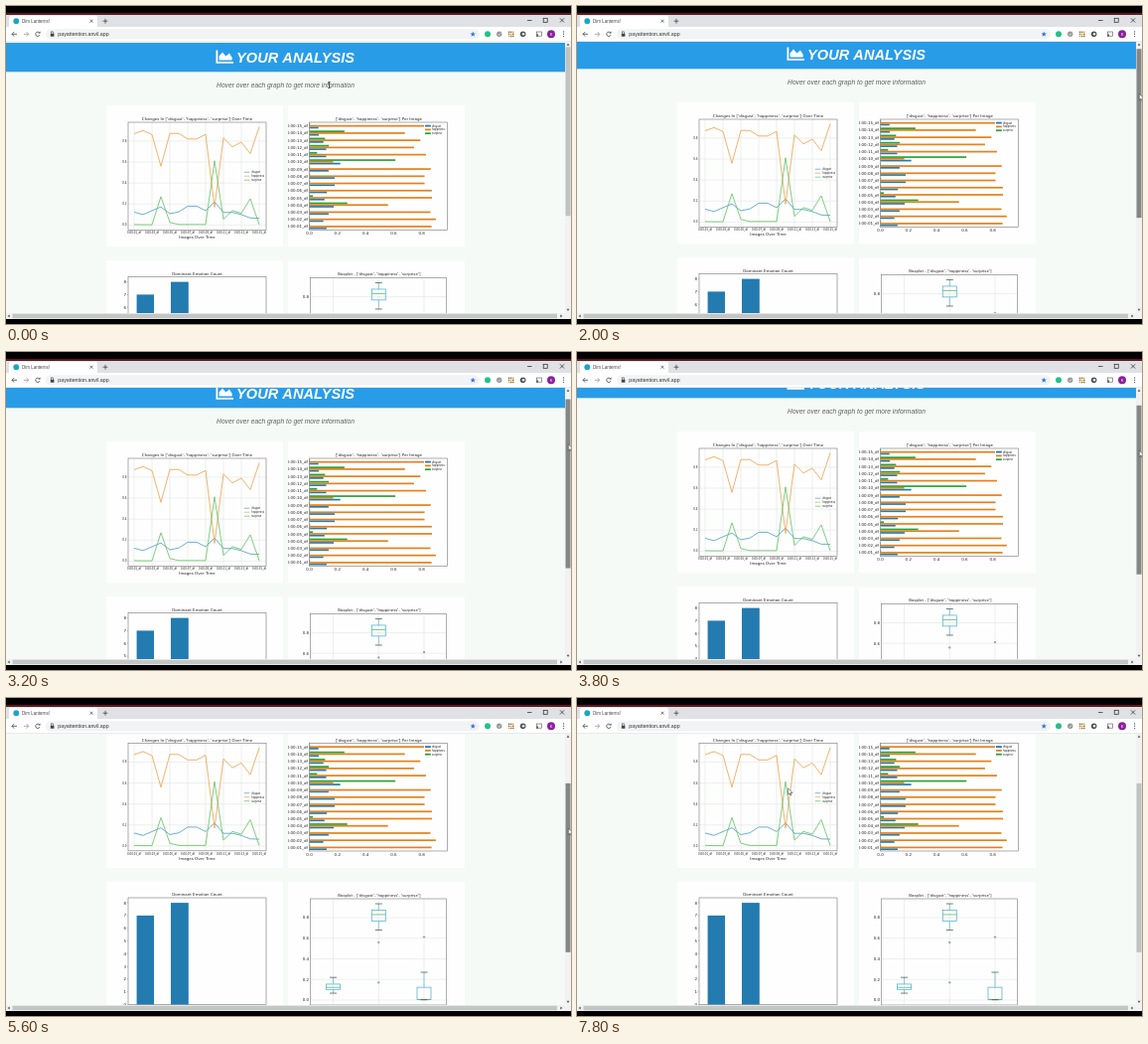
Recreate the animation shown at these times as an HTML page with a canvas. Size 569 px wide and 320 px high, loop 8 s.

```html
<!DOCTYPE html>
<html lang="en">
<head>
<meta charset="utf-8">
<title>Dim Lanterns!</title>
<style>
html, body { margin: 0; width: 100%; height: 100%; overflow: hidden; background: #000; }
canvas { display: block; width: 569px; height: 320px; }
</style>
</head>
<body>
<canvas id="stage"></canvas>
<script>
const W = 569, H = 320, LOOP = 8000, STEP = 200;
const canvas = document.getElementById('stage');
const ctx = canvas.getContext('2d');
const ratio = window.devicePixelRatio || 1;
canvas.width = Math.round(W * ratio);
canvas.height = Math.round(H * ratio);

const PLOT = '"DejaVu Sans", sans-serif';
const UI = '"Liberation Sans", Arial, sans-serif';
const BLUE = '#237bb0', ORANGE = '#e5811d', GREEN = '#2da337';
const AXIS = '#777', GRID = '#dde1df', INK = '#222';

const series = [
  { name: 'disgust', color: BLUE, line: '#4b9cc6',
    data: [.123, .1, .137, .173, .108, .125, .18, .18, .137, .22, .12, .12, .1, .067, .065] },
  { name: 'happiness', color: ORANGE, line: '#eda14b',
    data: [.87, .9, .862, .56, .873, .872, .82, .82, .864, .17, .83, .745, .79, .68, .935] },
  { name: 'surprise', color: GREEN, line: '#62c062',
    data: [.005, .003, .003, .27, .025, .005, .005, .005, .005, .612, .055, .138, .112, .25, .005] }
];

// time, page offset
const scrollKeys = [[0, 0], [1600, 0], [2000, 3], [2400, 8.7], [2600, 10], [3400, 10], [3600, 13],
  [3800, 20], [4400, 55], [4600, 63], [5200, 71.5], [8000, 71.5]];

function track(keys, t) {
  let i = 1;
  while (i < keys.length - 1 && keys[i][0] < t) i++;
  const [t0, a] = keys[i - 1], [t1, b] = keys[i];
  return a + (b - a) * Math.min(1, Math.max(0, (t - t0) / (t1 - t0)));
}

function ease(t, from, to) {
  const p = Math.min(1, Math.max(0, (t - from) / (to - from)));
  return p * p * (3 - 2 * p);
}

const mix = (a, b, p) => a + (b - a) * p;

function rect(x, y, w, h, color) {
  ctx.fillStyle = color;
  ctx.fillRect(x, y, w, h);
}

function frame(x, y, w, h, color, width = .6) {
  ctx.strokeStyle = color;
  ctx.lineWidth = width;
  ctx.strokeRect(x, y, w, h);
}

function path(points, color, width = .6) {
  ctx.strokeStyle = color;
  ctx.lineWidth = width;
  ctx.beginPath();
  points.forEach(([x, y]) => ctx.lineTo(x, y));
  ctx.stroke();
}

function shape(points, color) {
  ctx.fillStyle = color;
  ctx.beginPath();
  points.forEach(([x, y]) => ctx.lineTo(x, y));
  ctx.closePath();
  ctx.fill();
}

function disc(x, y, r, color) {
  ctx.fillStyle = color;
  ctx.beginPath();
  ctx.arc(x, y, r, 0, 7);
  ctx.fill();
}

// Tiny type is set ten times larger and scaled down to keep its spacing even.
function text(str, x, y, size, { align = 'left', color = INK, font = PLOT, style = '' } = {}) {
  ctx.save();
  ctx.translate(x, y + size * .36);
  ctx.scale(.1, .1);
  ctx.font = `${style} ${size * 10}px ${font}`;
  ctx.textAlign = align;
  ctx.fillStyle = color;
  ctx.fillText(str, 0, 0);
  ctx.restore();
}

const stamp = i => `0:00:${String(i + 1).padStart(2, '0')}_df`;

function lineChart() {
  const px = i => 129 + i * 9, py = v => 220.4 - v * 105.6;
  text("Changes In ['disgust', 'happiness', 'surprise'] Over Time", 192.5, 114, 4, { align: 'center' });
  for (let v = 0; v < .9; v += .2) {
    path([[123, py(v)], [262, py(v)]], GRID, .5);
    text(v.toFixed(1), 121.5, py(v), 2.7, { align: 'right' });
  }
  for (let i = 0; i < 15; i += 2) {
    path([[px(i), 117], [px(i), 225.3]], GRID, .5);
    text(stamp(i), px(i), 228.3, 2.6, { align: 'center' });
  }
  series.forEach(s => path(s.data.map((v, i) => [px(i), py(v)]), s.line, .8));
  frame(123, 117, 139, 108.3, AXIS);
  rect(238.5, 164.5, 22.5, 13, '#fdfefd');
  series.forEach((s, i) => {
    const y = 167.2 + i * 4;
    path([[239.8, y], [245.2, y]], s.line, .7);
    text(s.name, 247.3, y, 2.5);
  });
  text('Images Over Time', 192.5, 232.6, 4, { align: 'center' });
}

function barChart() {
  const px = v => 305.5 + v * 141.5;
  text("['disgust', 'happiness', 'surprise'] Per Image", 375.3, 114, 4, { align: 'center' });
  for (let i = 0; i < 15; i++) {
    const y = 222 - i * 7.23;
    series.forEach((s, k) => rect(305.5, y + .9 - k * 1.75 - .1, px(s.data[i]) - 305.5, 1.7, s.color));
    text(stamp(i), 304, y, 4, { align: 'right' });
  }
  for (let v = 0; v < .9; v += .2) text(v.toFixed(1), px(v), 229, 4, { align: 'center' });
  rect(421, 118.4, 22.4, 12, '#fdfefd');
  series.forEach((s, i) => {
    const y = 120.6 + i * 3.8;
    rect(422, y - .9, 5.8, 1.8, s.color);
    text(s.name, 429, y, 2.5);
  });
  frame(305.5, 117, 139, 108.5, AXIS);
}

function countChart() {
  const py = n => 380 - n * 12.8;
  text('Dominant Emotion Count', 192.5, 269.4, 4, { align: 'center' });
  rect(131.6, py(7), 17.4, 7 * 12.8, BLUE);
  rect(166, py(8), 17.8, 8 * 12.8, BLUE);
  for (let n = 0; n < 9; n++) {
    text(n, 121, py(n), 4, { align: 'right' });
    path([[122, py(n)], [123, py(n)]], AXIS, .5);
  }
  frame(123, 272.5, 139, 107.5, AXIS);
}

function box(x, low, q1, mid, q3, high, dots) {
  const py = v => 375.5 - v * 103.7, edge = '#5bb3d3';
  path([[x, py(high)], [x, py(q3)]], edge, .7);
  path([[x, py(q1)], [x, py(low)]], edge, .7);
  frame(x - 7, py(q3), 14, py(q1) - py(q3), edge, .8);
  path([[x - 7, py(mid)], [x + 7, py(mid)]], '#58bd68', .8);
  [low, high].forEach(v => path([[x - 3.5, py(v)], [x + 3.5, py(v)]], '#444', .7));
  dots.forEach(v => {
    ctx.beginPath();
    ctx.arc(x, py(v), .75, 0, 7);
    ctx.strokeStyle = '#444';
    ctx.lineWidth = .5;
    ctx.stroke();
  });
}

function boxChart() {
  text("Boxplot - ['disgust', 'happiness', 'surprise']", 375.8, 270, 3.93, { align: 'center' });
  for (let v = 0; v < .9; v += .2) {
    const y = 375.5 - v * 103.7;
    path([[306.5, y], [443.5, y]], GRID, .5);
    text(v.toFixed(1), 305, y, 4, { align: 'right' });
  }
  [329.5, 375.3, 421].forEach(x => path([[x, 273.5], [x, 380]], GRID, .5));
  box(329.5, .067, .103, .123, .155, .22, []);
  box(375.3, .68, .768, .83, .873, .935, [.56, .17]);
  box(421, .003, .004, .006, .124, .27, [.612]);
  frame(306.5, 273.5, 137, 107, AXIS);
}

function card(x, y, draw) {
  const h = y < 200 ? 142.5 : 142;
  rect(x, y, 178, h, '#fdfefd');
  ctx.save();
  ctx.beginPath();
  ctx.rect(x, y, 178, h);
  ctx.clip();
  draw();
  ctx.restore();
}

function page(offset) {
  ctx.save();
  ctx.beginPath();
  ctx.rect(0, 36, 563, 273);
  ctx.clip();
  rect(0, 36, 563, 273, '#f5faf6');
  ctx.translate(0, -offset);
  rect(0, 37, 563, 29.3, '#299ce8');
  path([[212.4, 44.5], [212.4, 56.8], [229, 56.8]], '#fff', 1.8);
  shape([[214.6, 54.6], [214.6, 50.6], [218, 46.4], [221.4, 50.4], [225, 47.6], [227.7, 52], [227.7, 54.6]], '#fff');
  text('YOUR ANALYSIS', 291.6, 51.6, 14.6, { align: 'center', color: '#fff', font: UI, style: 'italic bold' });
  text('Hover over each graph to get more information', 281.5, 80, 6.7,
    { align: 'center', color: '#5c605e', font: UI, style: 'italic' });
  card(101, 100, lineChart);
  card(284, 100, barChart);
  card(101, 256, countChart);
  card(284, 256.5, boxChart);
  ctx.restore();
}

function arrow(x, y, dx, dy, s, color) {
  shape([[x + dx * s, y + dy * s], [x - dx * s * .5 - dy * s, y - dy * s * .5 - dx * s],
    [x - dx * s * .5 + dy * s, y - dy * s * .5 + dx * s]], color);
}

function cross(x, y, s, color, width) {
  path([[x - s, y - s], [x + s, y + s]], color, width);
  path([[x - s, y + s], [x + s, y - s]], color, width);
}

function scrollbars(offset, held) {
  rect(563, 36, 6, 279, '#f1f2f1');
  rect(0, 309, 563, 6, '#f1f2f1');
  rect(6.5, 309.7, 548.5, 4.6, '#c4c6c5');
  rect(563.5, 41.3 + offset * .623, 5, 170, held ? '#858786' : '#c1c3c2');
  arrow(566, 39, 0, -1, 1.4, '#555');
  arrow(566, 305.5, 0, 1, 1.4, '#555');
  arrow(3, 312, -1, 0, 1.4, '#555');
  arrow(559, 312, 1, 0, 1.4, '#555');
}

function nav(x, dir, color) {
  path([[x - 2.5, 28.3], [x + 2.5, 28.3]], color, .8);
  path([[x + dir * .3, 26], [x + dir * 2.5, 28.3], [x + dir * .3, 30.6]], color, .8);
}

function browser() {
  rect(0, 0, W, 7, '#000');
  rect(0, 6.8, W, 2.4, '#5b1c24');
  rect(0, 9, W, 12.5, '#dfe1e5');
  ctx.fillStyle = '#fff';
  ctx.beginPath();
  ctx.roundRect(3, 9.8, 89, 13, 2);
  ctx.fill();
  rect(0, 21, W, 15, '#fff');
  rect(0, 35.4, W, .6, '#dadcdb');
  disc(10.3, 15.2, 2.9, '#1ba5c4');
  text('Dim Lanterns!', 16, 15.2, 4.5, { font: UI, color: '#444' });
  cross(86, 15.2, 1.5, '#444', .7);
  path([[97.6, 15.2], [102.4, 15.2]], '#444', .8);
  path([[100, 12.8], [100, 17.6]], '#444', .8);
  path([[525, 14.5], [529.5, 14.5]], '#222', .7);
  frame(541.2, 12.3, 4, 4, '#222', .7);
  cross(560, 14.4, 2.1, '#222', .7);

  nav(8.5, -1, '#444');
  nav(20.3, 1, '#999');
  ctx.strokeStyle = '#444';
  ctx.lineWidth = .8;
  ctx.beginPath();
  ctx.arc(32, 28.3, 2.2, .3, 5.5);
  ctx.stroke();
  shape([[32.3, 27.6], [34.5, 27.6], [34.5, 25.4]], '#444');
  ctx.fillStyle = '#f1f3f4';
  ctx.beginPath();
  ctx.roundRect(40, 23.2, 437, 10.2, 5.1);
  ctx.fill();
  rect(44.8, 27.8, 3.6, 2.9, '#444');
  frame(45.6, 25.9, 2, 2.5, '#444', .6);
  text('payattention.anvil.app', 52.3, 28.2, 5.27, { font: UI, color: '#333' });

  const star = [...Array(10).keys()].map(i => {
    const a = i * Math.PI / 5 - Math.PI / 2, r = i % 2 ? 1.2 : 2.9;
    return [470.2 + r * Math.cos(a), 28.4 + r * Math.sin(a)];
  });
  shape(star, '#2f74d0');
  disc(485, 28.3, 3, '#24c184');
  disc(496.7, 28.3, 2.7, '#949896');
  path([[495.4, 28.4], [496.4, 29.4], [498.1, 27.3]], '#fff', .6);
  for (let i = 0; i < 9; i++) {
    rect(505.8 + i % 3 * 2.1, 25.5 + Math.floor(i / 3) * 2.1, 1.5, 1.5, ['#d84a3d', '#4c9b50', '#e0ad34'][(i + Math.floor(i / 3)) % 3]);
  }
  disc(520.6, 28.3, 2.8, '#4c5054');
  disc(521, 28.2, 1.3, '#e8e9e9');
  frame(534.5, 26, 5, 4.2, '#666', .7);
  rect(534, 28.4, 2, 2.3, '#666');
  disc(549, 28.2, 4, '#8a219c');
  text('K', 549, 28.2, 4, { align: 'center', font: UI, color: '#fff' });
  [25.9, 28.2, 30.5].forEach(y => disc(561.6, y, .6, '#444'));
}

function pointer(t, offset) {
  const out = ease(t, 300, 1500), back = ease(t, 6500, 7700);
  let x = mix(325.5, 566.3, out), y = mix(79.5, 86.5, out) + offset * .623;
  x = mix(x, 212.6, back);
  y = mix(y, 90.8, back);
  if (t < 400) {
    path([[x - 1.3, y - 3], [x + 1.3, y - 3]], '#222', .6);
    path([[x, y - 3], [x, y + 3]], '#222', .7);
    path([[x - 1.3, y + 3], [x + 1.3, y + 3]], '#222', .6);
    return;
  }
  const tip = [[0, 0], [0, 6.4], [1.5, 5], [2.5, 7.2], [3.4, 6.8], [2.5, 4.7], [4.5, 4.6]].map(([a, b]) => [x + a, y + b]);
  shape(tip, '#fff');
  path([...tip, tip[0]], '#333', .55);
}

function draw(t) {
  ctx.setTransform(ratio, 0, 0, ratio, 0, 0);
  rect(0, 0, W, H, '#000');
  const offset = track(scrollKeys, t);
  page(offset);
  scrollbars(offset, t >= 1600 && t < 5800);
  browser();
  pointer(t, offset);
}

const start = performance.now();
function tick() {
  const t = (performance.now() - start) % LOOP;
  draw(Math.floor(t / STEP) * STEP);
  requestAnimationFrame(tick);
}
tick();
</script>
</body>
</html>
```
